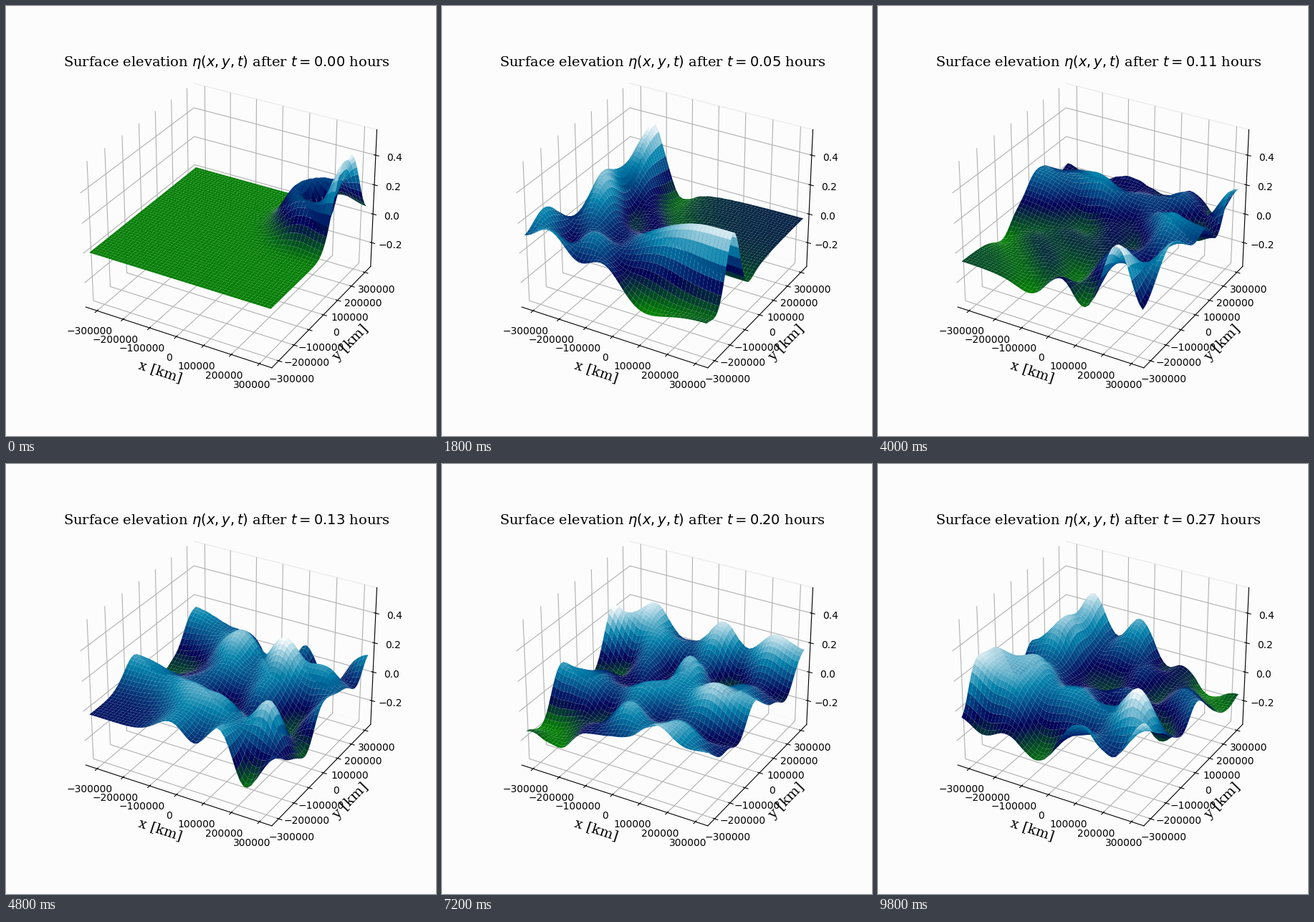
Animation of 600 by 600 pixels, one loop 10 s. Source, as a matplotlib script:

```python
import numpy as np
import matplotlib.pyplot as plt
from matplotlib.animation import FuncAnimation

# Linear shallow-water waves in a closed square basin
SIZE = 660e3
N = 50
FRAMES = 50
STEPS = 50             # time steps between frames
CFL = 0.1
HOURS = 0.00551        # shown time per frame
PAPER = "#fcfcfc"

x = np.linspace(-SIZE / 2, SIZE / 2, N)
X, Y = np.meshgrid(x, x, indexing="ij")


def simulate():
    eta = np.exp(-((X - SIZE / 2.7) ** 2 + (Y - SIZE / 4) ** 2) / (2 * 50e3 ** 2))
    u = np.zeros((N - 1, N))
    v = np.zeros((N, N - 1))
    states = []
    for step in range(1, FRAMES * STEPS):
        u -= CFL * (eta[1:] - eta[:-1])
        v -= CFL * (eta[:, 1:] - eta[:, :-1])
        eta[:-1] -= CFL * u
        eta[1:] += CFL * u
        eta[:, :-1] -= CFL * v
        eta[:, 1:] += CFL * v
        if (step + 1) % STEPS == 0:
            states.append(eta.copy())
    return states


def corners(a):
    quads = [a[:-1, :-1], a[:-1, 1:], a[1:, 1:], a[1:, :-1]]
    return np.stack(quads, axis=-1).reshape(-1, 4)


def padded(low, high):
    pad = (high - low) / 48
    return low - pad, high + pad


heights = simulate()
QX, QY = corners(X), corners(Y)

fig = plt.figure(figsize=(6, 6), dpi=100, facecolor=PAPER)
ax = fig.add_subplot(projection="3d", facecolor=PAPER)
surf = ax.plot_surface(X, Y, heights[0], rstride=1, cstride=1, cmap="ocean")

ax.set_xlim(*padded(-SIZE / 2, SIZE / 2))
ax.set_ylim(*padded(-SIZE / 2, SIZE / 2))
ax.set_zlim(*padded(-0.35, 0.55))
ax.set_zticks([-0.2, 0, 0.2, 0.4])
for axis in (ax.xaxis, ax.yaxis, ax.zaxis):
    axis.set_pane_color(PAPER)
ax.yaxis.pane.set_edgecolor("#ececec")

ax.set_xlabel("x [km]", family="serif", fontsize=14)
ax.set_ylabel("y [km]", family="serif", fontsize=14)
title = ax.set_title("", family="serif", fontsize=14, y=1.04)


def update(i):
    qz = corners(heights[i])
    level = qz.mean(axis=1)
    surf.set_verts(np.stack([QX, QY, qz], axis=-1))
    surf.set_array(level)
    surf.set_clim(level.min(), level.max())
    title.set_text(r"Surface elevation $\eta(x,y,t)$ after $t=%.2f$ hours"
                   % (i * HOURS))
    return surf, title


anim = FuncAnimation(fig, update, frames=FRAMES, interval=200,
                     repeat=True, repeat_delay=0, blit=False)
plt.show()
```
